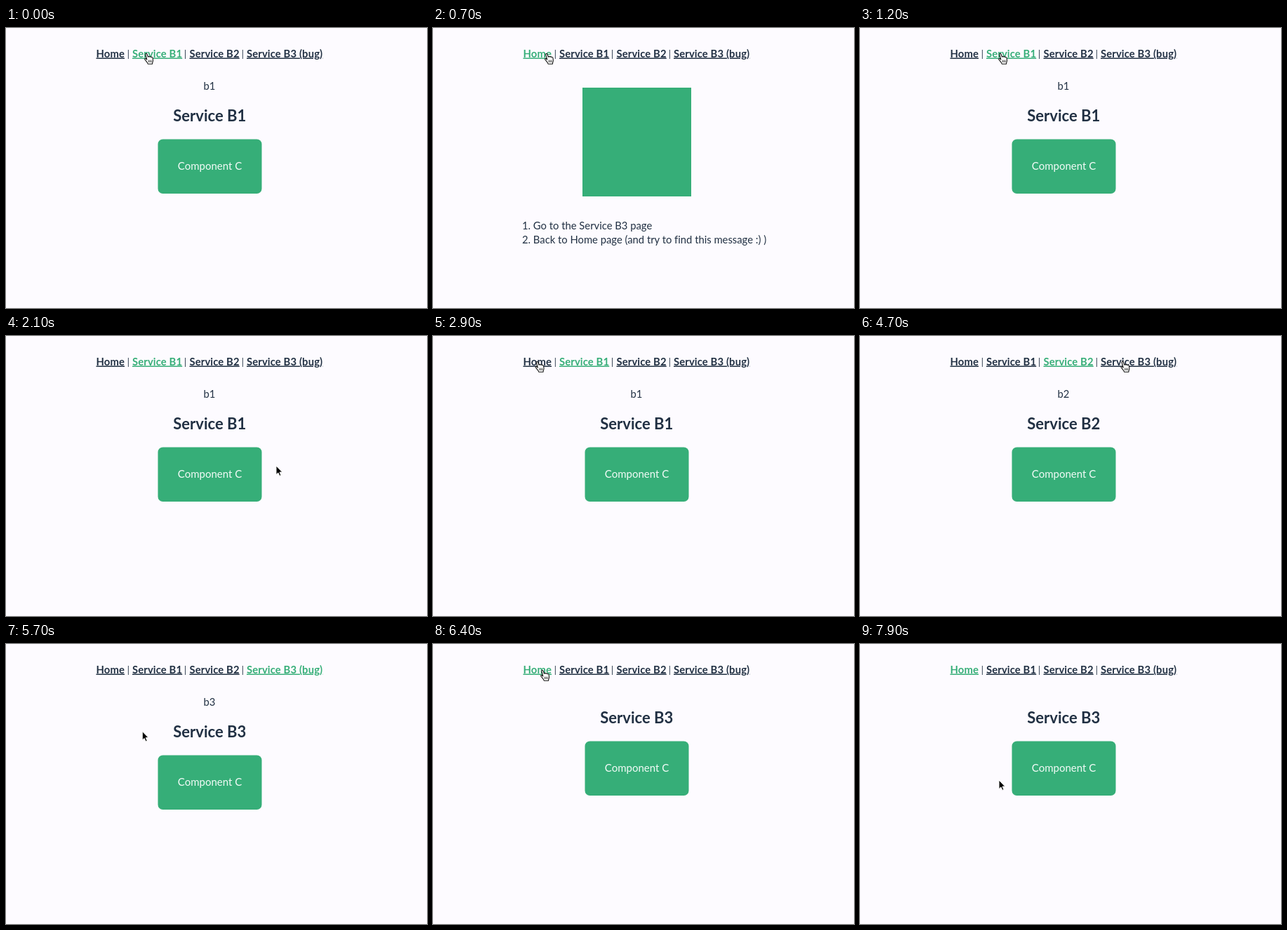
Write an HTML page that moves like this. It is 600 px wide and 399 px high and loops after 8 s.

```html
<!DOCTYPE html>
<html lang="en">
<head>
<meta charset="utf-8">
<title>Service pages</title>
<style>
html, body { margin: 0; width: 100%; height: 100%; overflow: hidden; background: #fdfbff; }
svg { display: block; width: 600px; height: 399px; }
text { font-family: Lato, "Open Sans", sans-serif; font-size: 14.8px; font-variant-ligatures: none; fill: #213043; }
.link { font-weight: 700; letter-spacing: .13px; text-decoration: underline; text-decoration-thickness: 1px; text-underline-offset: 2px; }
.link.on { fill: #36ae78; }
.bar { font-size: 12.5px; }
.mid { text-anchor: middle; }
.head { font-weight: 700; font-size: 22px; }
.box { fill: #36ae78; }
.label { font-size: 15px; fill: #f2fbf7; }
</style>
</head>
<body>
<svg viewBox="0 0 600 399">
  <g id="nav"></g>
  <g id="home">
    <rect class="box" x="213" y="85" width="155" height="155"/>
    <text x="127" y="287">1. Go to the Service B3 page</text>
    <text x="127" y="307">2. Back to Home page (and try to find this message :) )</text>
  </g>
  <text id="note" class="mid" x="290" y="88"></text>
  <g id="service">
    <text id="title" class="head mid" x="290.3" y="133"></text>
    <rect class="box" x="216.5" y="158.5" width="148" height="77.5" rx="7"/>
    <text class="label mid" x="290.5" y="202">Component C</text>
  </g>
  <g id="cursor" stroke-linejoin="round">
    <path id="arrow" fill="#000" stroke="#fff" d="M0 0V12.6L2.9 9.9L4.9 14.4L7 13.5L5 9.1H8.8Z"/>
    <g id="hand">
      <path fill="#fff" stroke="#111" stroke-width="1.1" d="M-1.2 .9C-1.5-.6.6-1 1.1.5L2.5 4.3C3.1 3.2 4.5 3.4 4.8 4.3C5.5 3.4 6.8 3.7 7 4.7C7.9 4.1 9 4.7 9.1 5.8L9.5 9C9.6 11 8.6 11.7 8.5 14.2H2.2C1.8 12-1 9.8-2.2 7.7C-2.8 6.5-1.2 6 0 7.3L.8 8Z"/>
      <path fill="none" stroke="#111" stroke-width=".8" d="M3.3 8.7V12M5.2 8.7V12M7.1 8.7V12"/>
    </g>
  </g>
</svg>
<script>
const LOOP = 8000, STEP = 100, PAUSE = [6400, 7000];
const HOME = 0, B1 = 1, B2 = 2, B3 = 3;
const $ = id => document.getElementById(id);

const links = [
  { label: "Home", left: 128.5, right: 169 },
  { label: "Service B1", left: 180, right: 250 },
  { label: "Service B2", left: 261.5, right: 332 },
  { label: "Service B3 (bug)", left: 343, right: 453 }
];

const clicks = [
  { t: 0, link: B1 }, { t: 500, link: HOME }, { t: 1100, link: B1 },
  { t: 3000, link: HOME }, { t: 4400, link: B2 }, { t: 4900, link: B3 },
  { t: 6200, link: HOME }
];

// where the pointer wanders between clicks
const strays = [
  { t: 2100, x: 385, y: 185 }, { t: 5400, x: 240, y: 212 },
  { t: PAUSE[0], x: 156, y: 38 }, { t: PAUSE[1], x: 156, y: 38 },
  { t: 7500, x: 450, y: 225 }, { t: 7900, x: 198, y: 194 }
];

// the pointer rests on a link just before and after each click
const rests = clicks.flatMap(({ t, link }) => {
  const { left, right } = links[link];
  const x = left + Math.max(20, (right - left) * .285);
  return [{ t: t - 200, x, y: 37 }, { t: t + 100, x, y: 37 }];
});
const path = [...rests, ...strays].sort((a, b) => a.t - b.t);

function addText(x, label, cls) {
  const el = document.createElementNS("http://www.w3.org/2000/svg", "text");
  el.setAttribute("x", x);
  el.setAttribute("y", 41.5);
  el.setAttribute("class", cls);
  el.textContent = label;
  $("nav").append(el);
  return el;
}
links.forEach((link, i) => {
  link.el = addText(link.left, link.label, "link");
  if (i) addText((links[i - 1].right + link.left) / 2 - .3, "|", "bar mid");
});

function pointerAt(t) {
  const a = path.findLast(p => p.t <= t);
  const b = path.find(p => p.t > t) || a;
  const u = (t - a.t) / (b.t - a.t || 1), ease = u * u * (3 - 2 * u);
  return [a.x + (b.x - a.x) * ease, a.y + (b.y - a.y) * ease];
}

const show = (id, on) => { $(id).style.display = on ? "" : "none"; };

function drawPage(t) {
  const past = clicks.filter(c => c.t <= t).map(c => c.link);
  const active = past.at(-1);
  // leaving B3 loses its note but keeps its page on screen
  const stuck = past.at(-2) === B3;
  const page = stuck ? B3 : active;
  links.forEach((link, i) => link.el.classList.toggle("on", i === active));
  show("home", page === HOME);
  show("service", page !== HOME);
  $("note").textContent = active === HOME ? "" : "b" + page;
  $("title").textContent = "Service B" + page;
  $("service").setAttribute("transform", `translate(0 ${stuck ? -20 : 0})`);
}

function drawPointer(t) {
  const [x, y] = pointerAt(t);
  const over = y > 28 && y < 46 && links.some(l => x >= l.left && x <= l.right);
  show("hand", over);
  show("arrow", !over);
  $("cursor").setAttribute("transform", `translate(${x} ${y})`);
}

const start = performance.now();
function tick() {
  let t = Math.floor((performance.now() - start) % LOOP / STEP) * STEP;
  if (t > PAUSE[0] && t < PAUSE[1]) t = PAUSE[0];
  drawPage(t);
  drawPointer(t);
  requestAnimationFrame(tick);
}
tick();
</script>
</body>
</html>
```
